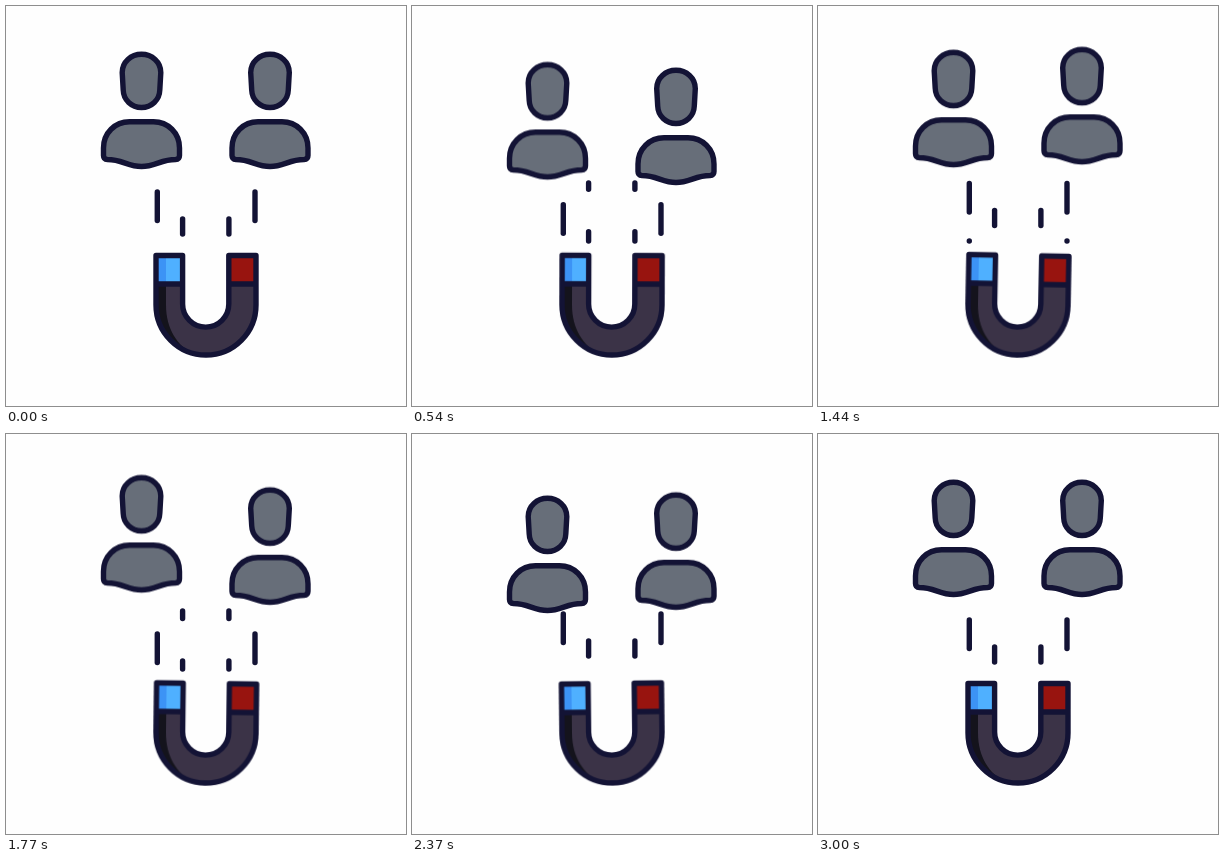
These frames come from a looping animation (400 by 400 pixels, 5090 ms). An HTML page:

```html
<!DOCTYPE html>
<html lang="en">
<head>
<meta charset="utf-8">
<title>Magnet attracting people</title>
<style>
  html, body { margin: 0; width: 100%; height: 100%; overflow: hidden; background: #fefefe; }
  svg { display: block; width: 100%; height: 100%; }

  .ink { stroke: #131335; stroke-width: 5.4; stroke-linecap: round; stroke-linejoin: round; }
  .person { fill: #676e79; }

  .left, .right, .magnet, .dash {
    animation: 5.09s cubic-bezier(.37, 0, .63, 1) infinite;
  }
  .left { animation-name: bob-left; }
  .right { animation-name: bob-right; }
  .magnet { animation-name: sway; transform-origin: 200px 299px; }
  .dash { animation-name: pull; stroke-dashoffset: var(--start); }
  .long { --start: -9px; stroke-dasharray: 28.5 29; }
  .short { --start: -36px; stroke-dasharray: 15 42.5; }

  @keyframes bob-left {
    0%, 58.94%, 100% { transform: translateY(0); }
    18.07% { transform: translateY(16.3px); }
    32.42% { transform: translateY(-6px); }
    46.95% { transform: translateY(16px); }
  }
  @keyframes bob-right {
    0%, 58.94%, 100% { transform: translateY(0); }
    10.41% { transform: translateY(16px); }
    25.93% { transform: translateY(-6px); }
    41.26% { transform: translateY(16px); }
  }
  @keyframes pull {
    0%, 58.94%, 100% { stroke-dashoffset: var(--start); }
    16.9%, 37.33% { stroke-dashoffset: calc(var(--start) - 18.2px); }
    27.5%, 49.12% { stroke-dashoffset: calc(var(--start) + 9px); }
  }
  @keyframes sway {
    0%, 58.94%, 100% { transform: rotate(0); }
    5.89% { transform: rotate(1deg); }
    16.7% { transform: rotate(-1deg); }
    28.29% { transform: rotate(1.1deg); }
    50.29% { transform: rotate(-.8deg); }
  }
</style>
</head>
<body>
<svg viewBox="0 0 400 400">
  <defs>
    <g id="person" class="person ink">
      <path d="M135.5 48.3C146 48.3 154.8 56 154.8 66.5L153.8 84C153.5 94 145.500 101.500 135.5 101.500S117.500 94 117.200 84L116.200 66.500C116.200 56 125 48.300 135.500 48.300Z"/>
      <path d="M123.500 115.800H147.500C162 115.800 173.500 127 173.500 142V149.500Q173.500 153.300 169.500 153.500C155 153.500 149 160.500 135.500 160.500S116 153.500 101.500 153.500Q97.500 153.300 97.500 149.500V142C97.500 127 109 115.800 123.500 115.800Z"/>
    </g>
  </defs>

  <g class="left"><use href="#person"/></g>
  <g class="right"><use href="#person" x="128.5"/></g>

  <g class="ink" fill="none">
    <path class="dash long" d="M151.300 177V235"/>
    <path class="dash short" d="M176.600 177V235"/>
    <path class="dash short" d="M222.900 177V235"/>
    <path class="dash long" d="M249 177V235"/>
  </g>

  <g class="magnet">
    <path fill="#3b3347" d="M150 278V299A50 50 0 0 0 250 299V278H222.800V298A23.100 23.100 0 0 1 176.600 298V278Z"/>
    <path fill="#14131c" d="M150 278H160V299C160 322 171 341 189 348C166 345 150 324 150 299Z"/>
    <path fill="#4fb0ff" d="M150 249.500H176.600V278H150Z"/>
    <path fill="#3c93f5" d="M150 249.500H160V278H150Z"/>
    <path fill="#98140f" d="M222.800 249.500H250V278H222.800Z"/>
    <path class="ink" fill="none" d="M150 249.500V299A50 50 0 0 0 250 299V249.500H222.800V298A23.100 23.100 0 0 1 176.600 298V249.500ZM150 278H176.600M222.800 278H250"/>
  </g>
</svg>
</body>
</html>
```
